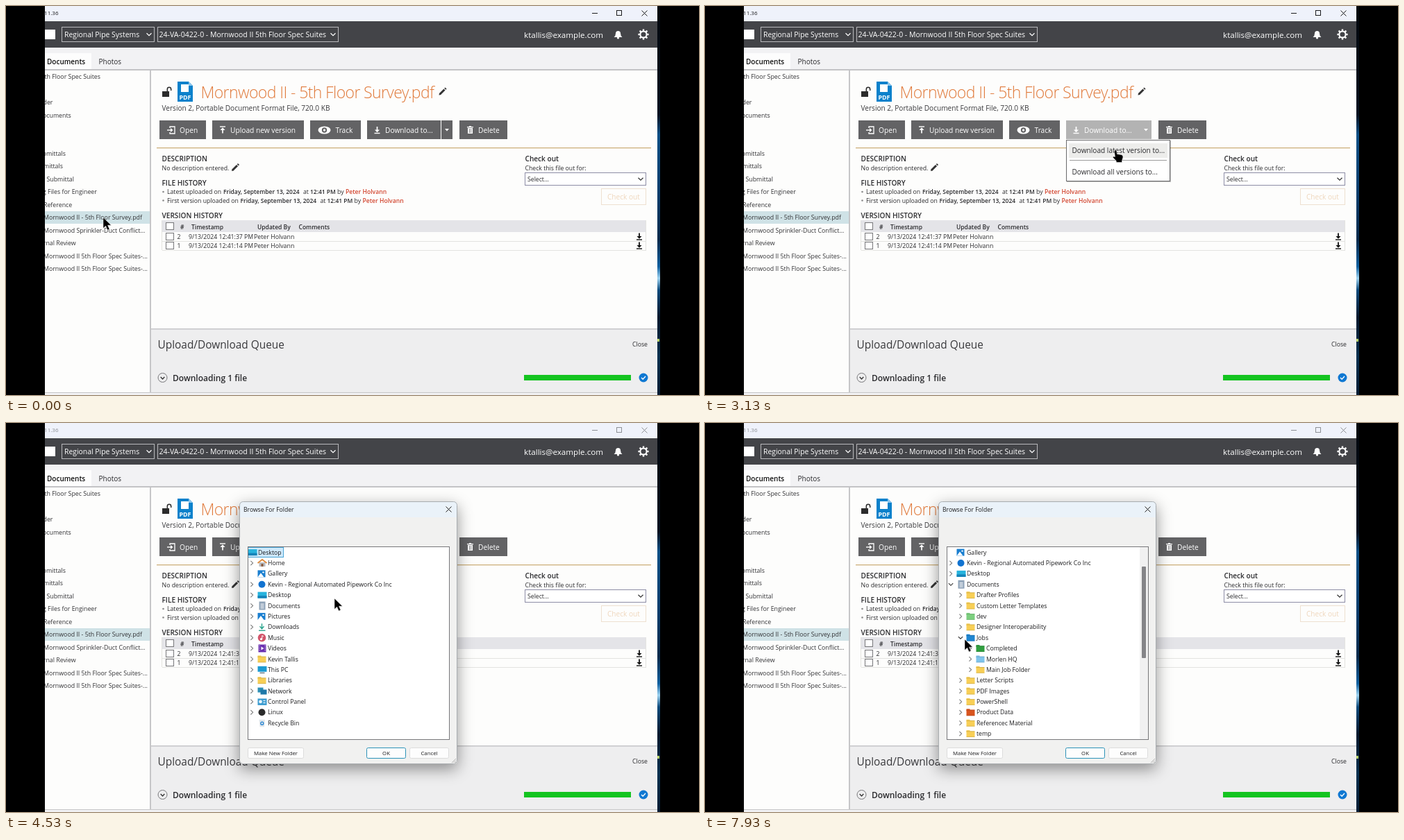
Write an HTML page with a canvas that moves like this. It is 998 px wide and 561 px high and loops after 8 s.

```html
<!DOCTYPE html>
<html lang="en">
<head>
<meta charset="utf-8">
<title>Download to folder</title>
<style>
html, body { margin: 0; width: 100%; height: 100%; overflow: hidden; background: #000; }
canvas { display: block; }
</style>
</head>
<body>
<canvas id="stage" width="998" height="561"></canvas>
<script>
(() => {
const W = 998, H = 561, LOOP = 8000;
const stage = document.getElementById('stage').getContext('2d');
const layer = document.createElement('canvas');
layer.width = W; layer.height = H;
const layerCtx = layer.getContext('2d');
let g = stage;

// ---- drawing helpers ----
const INK = '#2b2b2e';
function text(s, x, y, size = 8.8, color = INK, weight = 400, align = 'left', track = 0) {
  g.font = `${weight} ${size}px "Open Sans", "Noto Sans", sans-serif`;
  g.letterSpacing = track + 'px';
  g.textAlign = align;
  g.fillStyle = color;
  g.fillText(s, x, y + size * 0.36);
}
const bold = (s, x, y, size, color) => text(s, x, y, size, color, 600);
function rect(x, y, w, h, color) { g.fillStyle = color; g.fillRect(x, y, w, h); }
function frame(x, y, w, h, color, lw = 1) {
  g.strokeStyle = color; g.lineWidth = lw;
  g.strokeRect(x + 0.5, y + 0.5, w - 1, h - 1);
}
function trace(points) {
  g.beginPath();
  for (let i = 0; i < points.length; i += 2) g.lineTo(points[i], points[i + 1]);
}
function poly(points, color) {
  trace(points);
  g.closePath(); g.fillStyle = color; g.fill();
}
function line(points, color, lw = 1) {
  trace(points);
  g.strokeStyle = color; g.lineWidth = lw; g.stroke();
}
function disc(x, y, r, color) {
  g.beginPath(); g.arc(x, y, r, 0, 7); g.fillStyle = color; g.fill();
}
function ring(x, y, r, color, lw = 1) {
  g.beginPath(); g.arc(x, y, r, 0, 7); g.strokeStyle = color; g.lineWidth = lw; g.stroke();
}
function round(x, y, w, h, r, fill, stroke) {
  g.beginPath(); g.roundRect(x, y, w, h, r);
  if (fill) { g.fillStyle = fill; g.fill(); }
  if (stroke) { g.strokeStyle = stroke; g.lineWidth = 1; g.stroke(); }
}
const down = (x, y, r, color, lw = 1.2) => line([x - r, y - r / 2, x, y + r / 2, x + r, y - r / 2], color, lw);
const right = (x, y, r, color, lw = 1) => line([x - r / 2, y - r, x + r / 2, y, x - r / 2, y + r], color, lw);
function cross(x, y, r, color) {
  line([x - r, y - r, x + r, y + r], color);
  line([x - r, y + r, x + r, y - r], color);
}
function arrowIcon(x, y, dir, color, lw = 1.7) {
  line([x, y - 4.5 * dir, x, y + 2 * dir], color, lw);
  poly([x - 3.5, y, x + 3.5, y, x, y + 3.8 * dir], color);
  line([x - 4, y + 5 * dir, x + 4, y + 5 * dir], color, 1.4);
}
function pencil(x, y) {
  line([x + 1.5, y - 1.5, x + 8, y - 8], '#333', 3);
  line([x + 8.8, y - 8.8, x + 10, y - 10], '#333', 3);
  poly([x, y, x + 0.6, y - 3, x + 3, y - 0.6], '#333');
}

// ---- motion: time, x, y ----
const path = [
  [0, 140, 305], [600, 140, 305], [1500, 545, 184], [1870, 549, 184], [2270, 636, 180],
  [2470, 636, 180], [2930, 591, 208], [3130, 591, 208], [3250, 593, 209], [4070, 593, 209],
  [4530, 473, 253], [4730, 473, 253], [5330, 353, 263], [6070, 353, 263],
  [6800, 367, 308], [7200, 367, 308], [7700, 374, 312], [8000, 374, 312]
];
const POPUP = [2400, 3230], OPEN = 3700, DOCS = 5400, JOBS = 7130;
function pointer(t) {
  const i = path.findIndex(k => k[0] > t);
  const [t0, x0, y0] = path[i - 1], [t1, x1, y1] = path[i];
  const p = (t - t0) / (t1 - t0), e = p * p * (3 - 2 * p);
  return { x: x0 + (x1 - x0) * e, y: y0 + (y1 - y0) * e };
}

// ---- main window ----
function desktopEdge() {
  const sky = g.createLinearGradient(0, 0, 0, H);
  [[0, '#02060c'], [0.28, '#04111f'], [0.33, '#0b4f86'], [0.5, '#083a68'], [0.6, '#06294a'],
   [0.67, '#0f5f9f'], [0.7, '#9fd4f2'], [0.73, '#0d4a7c'], [0.8, '#04182c'], [0.9, '#06304f'], [1, '#041c33']]
    .forEach(s => sky.addColorStop(...s));
  rect(937, 0, 5, H, sky);
  rect(938, 480, 3, 4, '#b9d36a');
}
function titleBar(active) {
  const c = active ? '#1c1c1e' : '#8d9096';
  rect(56, 0, 882, 22, '#eff2fb');
  text('11.36', 75.5, 10.5, 8, c, 400, 'right');
  line([844, 10.5, 852, 10.5], c);
  frame(879, 6, 8, 8, c);
  cross(919.5, 10.5, 4, c);
}
function header() {
  rect(56, 22, 882, 38, '#434448');
  rect(56, 34, 15, 14, '#fff');
  frame(80, 30, 134, 22, '#b9b9bc');
  frame(218, 30, 261, 22, '#b9b9bc');
  text('Regional Pipe Systems', 84, 41.5, 10.4, '#fff');
  text('24-VA-0422-0 - Mornwood II 5th Floor Spec Suites', 220.5, 41.5, 10.5, '#fff');
  down(206, 41, 3.5, '#fff');
  down(471, 41, 3.5, '#fff');
  text('ktallis@example.com', 860, 41.5, 11.6, '#fff', 400, 'right');
  g.beginPath();
  g.moveTo(875.5, 45); g.quadraticCurveTo(878, 43, 878, 39.5);
  g.arc(881.5, 39.5, 3.5, Math.PI, 0);
  g.quadraticCurveTo(885, 43, 887.5, 45);
  g.fillStyle = '#fff'; g.fill();
  disc(881.5, 46, 1.6, '#fff');
  ring(918, 41, 4.6, '#fff', 2);
  for (let a = 0; a < 8; a++) {
    const c = Math.cos(a * Math.PI / 4), s = Math.sin(a * Math.PI / 4);
    line([918 + 5 * c, 41 + 5 * s, 918 + 7.6 * c, 41 + 7.6 * s], '#fff', 2.4);
  }
}
function tabs() {
  rect(56, 60, 882, 32, '#f2f2f4');
  rect(56, 68, 67, 24, '#fdfdfd');
  bold('Documents', 59, 80, 10, '#111');
  text('Photos', 133.5, 80, 10);
  rect(56, 91, 882, 2, '#c3c3c6');
}
function sidebar(rowColor) {
  rect(56, 296, 151, 18, rowColor);
  rect(207, 93, 2, 465, '#c6c6c8');
  [['th Floor Spec Suites', 55.5, 102], ['der', 53.5, 139], ['ocuments', 53, 157.5], ['bmittals', 52.5, 212.5],
   ['mittals', 54, 231], ['Submittal', 58.5, 249.5], ['g Files for Engineer', 53, 268], ['Reference', 54, 286.5],
   ['Mornwood II - 5th Floor Survey.pdf', 54, 305], ['Mornwood Sprinkler-Duct Conflict...', 54, 323.5],
   ['rnal Review', 53.8, 342], ['Mornwood II 5th Floor Spec Suites-...', 54, 360.5],
   ['Mornwood II 5th Floor Spec Suites-...', 54, 379]
  ].forEach(([s, x, y]) => text(s, x, y, 8.8, '#333336'));
}
function fileHead() {
  rect(225, 123, 10, 8, '#2b2b2b');
  g.beginPath(); g.arc(235, 120, 2.7, Math.PI, 0);
  g.moveTo(232.3, 120); g.lineTo(232.3, 124); g.moveTo(237.7, 120); g.lineTo(237.7, 122);
  g.strokeStyle = '#2b2b2b'; g.lineWidth = 1.5; g.stroke();
  poly([247, 109, 263, 109, 269, 115, 269, 138, 247, 138], '#0b81cb');
  poly([263, 109, 263, 115, 269, 115], '#8cc6ec');
  rect(252, 113, 11, 11, '#fff');
  text('PDF', 258, 131.5, 8.8, '#fff', 700, 'center');
  text('Mornwood II - 5th Floor Survey.pdf', 280.5, 125, 23, '#e0793a', 300, 'left', -0.6);
  pencil(623.5, 128.5);
  text('Version 2, Portable Document Format File, 720.0 KB', 224.5, 147, 10.1, '#3a3a3d');
}
function button(x, w, label, tx, fill = '#636365') {
  rect(x, 165, w, 27, fill);
  text(label, tx, 179.5, 10.2, '#fff');
}
function toolbar(hot, popup) {
  const fill = popup ? '#b3b3b3' : hot ? '#8b8b8d' : '#636365';
  button(221, 67, 'Open', 250);
  line([236, 176, 236, 174, 243, 174, 243, 184, 236, 184, 236, 182], '#fff', 1.3);
  line([232, 179, 238, 179], '#fff', 1.4);
  poly([237, 176, 240.5, 179, 237, 182], '#fff');
  button(297, 132, 'Upload new version', 323);
  arrowIcon(312, 179, -1, '#fff');
  button(438, 73, 'Track', 474.5);
  g.beginPath(); g.ellipse(458.5, 179, 9, 5.5, 0, 0, 7); g.fillStyle = '#fff'; g.fill();
  disc(458.5, 179, 3.7, '#636365'); disc(458.5, 179, 1.7, '#fff');
  button(520, 106, 'Download to...', 546, fill);
  arrowIcon(534.5, 178.5, 1, '#fff');
  rect(627, 165, 16, 27, fill);
  if (popup) rect(626, 165, 1, 27, fill);
  poly([632, 177, 638, 177, 635, 180.5], '#fff');
  button(653, 69, 'Delete', 680);
  rect(665, 176, 7, 8, '#fff'); rect(664, 174, 9, 1.3, '#fff'); rect(667, 173, 3, 1, '#fff');
  line([667.5, 177, 667.5, 183], '#636365', 0.8); line([669.7, 177, 669.7, 183], '#636365', 0.8);
  rect(217, 204, 712, 1.3, '#cdb07c');
}
function historyLine(y, label, x) {
  disc(226.5, y, 1.3, '#8a8a8a');
  text(label, 232, y, 8.7);
  bold('Friday, September 13, 2024', x, y, 8.45);
  text('at', x + 115, y, 8.7);
  bold('12:41 PM', x + 125, y, 8.45);
  text('by', x + 164, y, 8.7);
  bold('Peter Holvann', x + 176, y, 8.6, '#d2452f');
}
function details() {
  bold('DESCRIPTION', 224.5, 220.5, 10.1);
  text('No description entered.', 224.5, 234, 8.8);
  pencil(325, 238);
  bold('FILE HISTORY', 224.5, 255.5, 10.1);
  historyLine(268, 'Latest uploaded on', 313);
  historyLine(280.5, 'First version uploaded on', 337.5);
  bold('VERSION HISTORY', 224.5, 302, 10.1);
  bold('Check out', 747.5, 220.5, 10.1);
  text('Check this file out for:', 747.5, 234, 8.7);
  rect(747, 240, 175, 19, '#fff'); frame(747, 240, 175, 19, '#8d8da6');
  text('Select...', 751, 249.5, 8.7);
  down(914, 249.5, 3.5, '#333');
  frame(857, 263, 65, 24, '#eee0d0');
  text('Check out', 866, 275.5, 10.1, '#efd7bd');
}
function table() {
  rect(225, 309, 697, 17, '#e4e4e8');
  const box = y => { rect(230, y, 12, 11, '#fff'); frame(230, y, 12, 11, '#77777a'); };
  box(312);
  [['#', 251], ['Timestamp', 267], ['Updated By', 362], ['Comments', 421.5]]
    .forEach(([s, x]) => bold(s, x, 318.5, 8.5));
  [['2', '37', 332.5], ['1', '14', 345.5]].forEach(([n, sec, y]) => {
    box(Math.round(y - 6));
    text(n, 246.5, y + 0.5, 8.7);
    text(`9/13/2024 12:41:${sec} PM`, 263, y + 0.5, 8.7);
    text('Peter Holvann', 357, y + 0.5, 8.8);
    arrowIcon(912, y - 0.5, 1, '#111', 1.8);
    rect(225, Math.round(y + 6), 697, 1, '#e3e3e0');
  });
  rect(224, 309, 1, 43, '#e3e3e0'); rect(921, 309, 1, 43, '#e3e3e0');
}
function queue() {
  rect(209, 465, 729, 96, '#eeeeef');
  rect(209, 465, 729, 1.5, '#c6c6c8');
  rect(56, 557, 882, 1, '#c6c6c8');
  rect(56, 558, 882, 3, '#f1f1f3');
  text('Upload/Download Queue', 218.5, 488.5, 15.4, '#3a3a3d');
  text('Close', 902, 488, 8.7);
  ring(225.5, 536, 6.5, '#77777a');
  down(225.5, 536.5, 2.8, '#333', 1.4);
  bold('Downloading 1 file', 240, 537, 12);
  rect(746, 532, 154, 8, '#14c420');
  disc(918, 536, 6.5, '#0f78d2');
  line([915, 536, 917.2, 538.2, 921, 534], '#fff', 1.3);
}
function popupMenu(hot) {
  rect(521, 194, 150, 60, 'rgba(0,0,0,.25)');
  rect(520, 193, 150, 60, '#fff'); frame(520, 193, 150, 60, '#6a6a6c');
  if (hot) rect(524, 198, 142, 21, '#ededeb');
  text('Download latest version to...', 528.5, 208.5, 10.1);
  rect(525, 222, 140, 1, '#9a9a9a');
  text('Download all versions to...', 528.5, 239.5, 10.1);
}

// ---- folder dialog ----
const YELLOW = '#f8cf56';
const folder = (name, color = YELLOW) => [name, (x, y) => {
  rect(x, y - 5, 5, 3, color);
  rect(x, y - 3.8, 12, 8.8, color);
  rect(x, y - 3.8, 12, 1, 'rgba(0,0,0,.15)');
  rect(x, y + 4, 12, 1, 'rgba(0,0,0,.12)');
}];
const dot = color => (x, y) => disc(x + 6, y, 5, color);
const panel = (color, shade) => (x, y) => { rect(x, y - 4.5, 13, 9, color); rect(x, y + 1, 13, 3.5, shade); };
const desk = panel('#27b3dd', '#1583b8');
function house(x, y) {
  rect(x + 2, y - 1, 9, 6, '#b8bcc2');
  rect(x + 5, y + 1, 3, 4, '#8a5a3c');
  line([x, y, x + 6.5, y - 5, x + 13, y], '#e08a3c', 1.8);
}
function gallery(x, y) {
  rect(x, y - 5, 11, 10, '#1a7fd0');
  poly([x, y + 5, x + 4.5, y - 1, x + 9, y + 5], '#fff');
  disc(x + 8, y - 2, 1.2, '#fff');
}
function paper(x, y) {
  rect(x + 2, y - 6, 9, 12, '#8fa3b8');
  for (let i = -3; i <= 3; i += 2) rect(x + 4, y + i, 5, 1, '#f3f6fa');
}
function save(x, y) {
  line([x + 6, y - 5, x + 6, y + 2], '#1f9f86', 1.3);
  line([x + 3, y - 1, x + 6, y + 2.5, x + 9, y - 1], '#1f9f86', 1.3);
  line([x + 1.5, y + 5, x + 11, y + 5], '#1f9f86', 1.3);
}
function music(x, y) {
  disc(x + 6, y, 5.8, '#d2566b');
  disc(x + 5, y + 2, 1.6, '#fff'); line([x + 6.3, y + 2, x + 6.3, y - 3, x + 8.5, y - 2], '#fff');
}
function film(x, y) {
  rect(x + 1, y - 5.5, 11, 11, '#6a2fb0');
  for (let i = -4; i < 5; i += 3) { rect(x + 2, y + i, 1, 1, '#fff'); rect(x + 10, y + i, 1, 1, '#fff'); }
  poly([x + 5, y - 2.5, x + 9, y, x + 5, y + 2.5], '#fff');
}
function computer(x, y) {
  rect(x, y - 5, 13, 8, '#1d9bd1'); rect(x + 3, y + 4, 7, 1.3, '#5b6b78');
}
function network(x, y) { rect(x, y - 5, 8, 7, '#2d8fb5'); rect(x + 4, y - 2, 9, 7, '#1e78a8'); }
function control(x, y) {
  rect(x, y - 4.5, 13, 9.5, '#3c9cd0'); disc(x + 4, y, 2.4, '#e9f5fb');
  rect(x + 8, y - 2, 3, 1.2, '#fff'); rect(x + 8, y + 1, 3, 1.2, '#fff');
}
function bin(x, y) {
  poly([x + 2, y - 5, x + 10.5, y - 5, x + 9.5, y + 5.5, x + 3, y + 5.5], '#dfe6ec');
  ring(x + 6.3, y + 0.5, 2, '#1c7fd0', 1.2);
}

const places = [['Home', house], ['Gallery', gallery],
  ['Kevin - Regional Automated Pipework Co Inc', dot('#1173d0')], ['Desktop', desk], ['Documents', paper]];
const more = [['Pictures', gallery], ['Downloads', save], ['Music', music], ['Videos', film], folder('Kevin Tallis'),
  ['This PC', computer], folder('Libraries'), ['Network', network], ['Control Panel', control],
  ['Linux', dot('#2b2b2b')], ['Recycle Bin', bin]];
const docsToJobs = [folder('Drafter Profiles'), folder('Custom Letter Templates'), folder('dev', '#7ccf7f'),
  folder('Designer Interoperability'), folder('Jobs', '#1f86d2')];
const docsAfterJobs = [...['Letter Scripts', 'PDF Images', 'PowerShell'].map(n => folder(n)),
  folder('Product Data', '#d9541e'),
  ...['Referencec Material', 'temp', 'Training', 'Coding Bench 2022', 'WindowsPowerShell'].map(n => folder(n))];
const jobs = [folder('Completed', '#2f9e3f'), folder('Morlen HQ', '#7fc4ec'), folder('Main Job Folder')];
const nest = (depth, list) => list.map(([name, icon]) => ({ name, icon, depth }));

function treeRows(t) {
  const docs = t < DOCS ? [] :
    [...nest(2, docsToJobs), ...(t < JOBS ? [] : nest(3, jobs)), ...nest(2, docsAfterJobs)];
  return [{ name: 'Desktop', icon: desk, depth: 0 }, ...nest(1, places), ...docs, ...nest(1, more)];
}
function tree(t) {
  const wide = t >= DOCS, first = wide ? 2 : 0;
  rect(348, 178, 291, 279, '#fff');
  g.save();
  g.beginPath(); g.rect(349, 179, 289, 277); g.clip();
  treeRows(t).slice(first, first + 18).forEach((row, i) => {
    const y = 186.6 + i * 15.38, x = 348.5 + row.depth * 14;
    if (row.depth === 0) {
      rect(348, 179, 52, 15, '#cfe9fb'); frame(348, 179, 52, 15, '#49a5d6');
    } else if (!/Gallery|Recycle/.test(row.name)) {
      const open = (row.name === 'Documents' && wide) || (row.name === 'Jobs' && t >= JOBS);
      (open ? down : right)(x - 8.5, y, 3.2, open ? '#333' : '#7d7d7d', 1.1);
    }
    row.icon(x, y);
    text(row.name, x + 14.5, y, 8.7, '#1d1d1f');
  });
  if (wide) {
    rect(626, 179, 12, 277, '#f1f1f1');
    round(629, t >= JOBS ? 207 : 208, 6, t >= JOBS ? 132 : 146, 1, '#858588');
  }
  g.restore();
  frame(348, 178, 291, 279, '#77777a');
}
function dialogButton(x, w, label, edge) {
  round(x + 0.5, 468.5, w - 1, 15, 2, '#fdfdfd', edge);
  text(label, x + w / 2, 476, 7.8, '#1d1d1f', 400, 'center');
}
function dialog(t) {
  g.save();
  g.shadowColor = 'rgba(0,0,0,.42)'; g.shadowBlur = 22; g.shadowOffsetY = 7;
  round(336, 113, 314, 379, 5, '#f1f1f0');
  g.restore();
  round(336, 113, 314, 23, [5, 5, 0, 0], '#eaf2f9');
  round(336.5, 113.5, 313, 378, 5, null, '#a9adb0');
  text('Browse For Folder', 342, 124.5, 8.6, '#1d1d1f');
  cross(637.5, 124.5, 4, '#222');
  tree(t);
  dialogButton(348, 81, 'Make New Folder', '#dcdcdc');
  dialogButton(519, 57, 'OK', '#2b92b8');
  dialogButton(581, 57, 'Cancel', '#dcdcdc');
  for (let i = 0; i < 3; i++) line([648, 484 + i * 2.5, 642 + i * 2.5, 490], '#a5a5a5', 0.8);
}
// The dialog is composed on its own layer so that it fades and grows as one.
function showDialog(t) {
  const p = Math.min(1, (t - OPEN) / 230);
  g = layerCtx;
  g.clearRect(0, 0, W, H);
  dialog(t);
  g = stage;
  const s = 0.86 + 0.14 * p, cx = 493, cy = 302.5, shift = 1 - p;
  g.save();
  g.globalAlpha = Math.min(1, p * 1.3);
  g.translate(cx - 7 * shift, cy - 6 * shift);
  g.scale(s, s);
  g.drawImage(layer, -cx, -cy);
  g.restore();
}

// ---- pointer shapes ----
function arrowCursor() {
  poly([0, 0, 0, 15.5, 3.6, 12.2, 6.2, 18, 9, 16.8, 6.5, 11.2, 11.5, 11.2], '#000');
}
function handCursor() {
  g.beginPath();
  g.moveTo(-1.5, 1); g.quadraticCurveTo(0, -1.5, 1.8, 1);
  g.lineTo(2.4, 5.5); g.lineTo(8.5, 6.5); g.quadraticCurveTo(11, 7, 11, 10);
  g.lineTo(9.5, 15); g.lineTo(9.5, 17.5); g.lineTo(1.5, 17.5);
  g.lineTo(1, 15); g.lineTo(-3.5, 10.5); g.quadraticCurveTo(-3.5, 8, -0.5, 9.5);
  g.closePath();
  g.fillStyle = '#000'; g.fill();
}
function cursor(p, hand) {
  g.save();
  g.translate(p.x, p.y);
  (hand ? handCursor : arrowCursor)();
  g.strokeStyle = 'rgba(255,255,255,.75)'; g.lineWidth = 0.6; g.stroke();
  g.restore();
}

function draw(t) {
  const p = pointer(t);
  const popup = t >= POPUP[0] && t < POPUP[1];
  const overButton = t < POPUP[1] && p.x > 520 && p.x < 643 && p.y < 192;
  const focusRow = p.x > 207 && t < POPUP[0];
  rect(0, 0, W, H, '#000');
  desktopEdge();
  g.save();
  g.beginPath(); g.rect(56, 0, 882, H); g.clip();
  rect(56, 0, 882, H, '#fdfdfc');
  titleBar(t < OPEN);
  header();
  tabs();
  sidebar(focusRow ? '#80b9cc' : '#cfe2e6');
  fileHead();
  toolbar(overButton, popup);
  details();
  table();
  queue();
  g.restore();
  if (popup) popupMenu(p.y > 197);
  if (t > OPEN) showDialog(t);
  cursor(p, overButton || popup);
}
function tick() {
  draw(performance.now() % LOOP);
  requestAnimationFrame(tick);
}
tick();
})();
</script>
</body>
</html>
```
